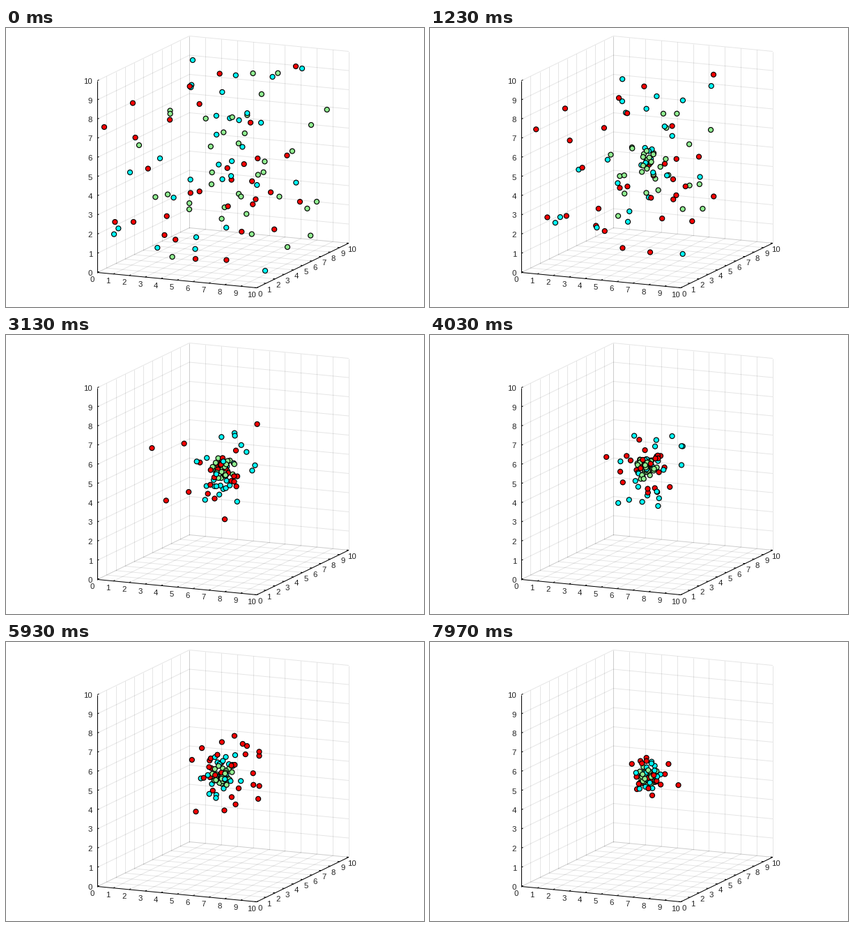
A matplotlib script that plays this animation: 600x400 px, repeating every 8000 ms.

```python
import numpy as np
import matplotlib.pyplot as plt
from matplotlib.animation import FuncAnimation
from matplotlib.collections import LineCollection

W, H, DPI = 600, 400, 100
FRAMES, LOOP = 240, 8000
PX = 72 / DPI

# Screen step of one unit along x, y and z, and the corner where all are zero
AXES = np.array([[22.87, 2.2], [13.2, -6.4], [0, -27.5]])
ORIGIN = np.array([131.2, 350.5])
CENTER = ORIGIN + 5 * AXES.sum(axis=0)
VIEW = np.cross(AXES[:, 1], AXES[:, 0])
VIEW *= np.sign(VIEW[1]) / np.linalg.norm(VIEW)

# Outermost starting dots on screen; the rest of each swarm is random
SWARMS = [
    dict(color="#90ee90", count=37, pull=24, core=1.0, drag=0.05, top=3.0,
         outer=[(191, 168), (446, 249), (404, 314), (438, 139)]),
    dict(color="#00ffff", count=31, pull=13, core=2.3, drag=0.4, top=9.0,
         outer=[(372, 348), (178, 207), (268, 46), (425, 58)]),
    dict(color="#ff0000", count=32, pull=5.6, core=2.4, drag=0.25, top=9.0,
         outer=[(141, 142), (183, 278), (416, 55), (272, 331)]),
]


def project(x, y, z):
    return ORIGIN + np.array([x, y, z]) @ AXES


def lift(screen):
    """Place screen points halfway along their line of sight in the cube."""
    flat = (np.array(screen) - CENTER) @ np.linalg.pinv(AXES)
    ends = np.stack([(-5 - flat) / VIEW, (5 - flat) / VIEW])
    near = ends.min(axis=0).max(axis=1)
    far = ends.max(axis=0).min(axis=1)
    return flat + ((near + far) / 2)[:, None] * VIEW


def swing(radius, pull, core, drag, top, sub=4):
    """Signed distance from the centre at every frame."""
    dt = LOOP / 1000 / FRAMES / sub
    r, v = radius.copy(), np.zeros_like(radius)
    track = []
    for _ in range(FRAMES):
        track.append(r.copy())
        for _ in range(sub):
            v = v - dt * (pull * r / (r * r + core * core) + drag * v)
            v = np.clip(v, -top, top)
            r = r + dt * v
    return np.array(track)


def fly(swarm):
    """Positions relative to the centre: frame, dot, axis."""
    outer = lift(swarm["outer"])
    inner = rng.uniform(-4.5, 4.5, (swarm["count"] - len(outer), 3))
    start = np.vstack([outer, inner])
    radius = np.linalg.norm(start, axis=1)
    track = swing(radius, *(swarm[k] for k in ("pull", "core", "drag", "top")))
    return track[:, :, None] * (start / radius[:, None])


rng = np.random.default_rng(5)
paths = np.concatenate([fly(s) for s in SWARMS], axis=1)
colors = np.repeat([s["color"] for s in SWARMS], [s["count"] for s in SWARMS])
spots = CENTER + paths @ AXES
order = np.argsort(-(paths @ VIEW), axis=1)

fig = plt.figure(figsize=(W / DPI, H / DPI), dpi=DPI, facecolor="white")
ax = fig.add_axes([0, 0, 1, 1])
ax.set_xlim(0, W)
ax.set_ylim(H, 0)
ax.axis("off")


def label(k, at, shift, align="center"):
    x, y = at + np.array(shift)
    ax.text(x, y, str(k), ha=align, va="center_baseline", color="#222222",
            family="Liberation Sans", size=11.4 * PX)


grid = []
edges = [(project(0, 0, 0), project(0, 0, 10)),
         (project(0, 0, 0), project(10, 0, 0)),
         (project(10, 0, 0), project(10, 10, 0))]
for k in range(11):
    grid += [(project(0, k, 0), project(0, k, 10)),
             (project(0, 0, k), project(0, 10, k)),
             (project(k, 10, 0), project(k, 10, 10)),
             (project(0, 10, k), project(10, 10, k)),
             (project(k, 0, 0), project(k, 10, 0)),
             (project(0, k, 0), project(10, k, 0))]
    edges += [(project(0, 0, k), project(0, 0.17, k)),
              (project(k, 0, 0), project(k, 0.17, 0)),
              (project(10, k, 0), project(9.87, k, 0))]
    label(k, project(0, 0, k), (-7, 0.5), "right")
    label(k, project(k, 0, 0), (-7.5, 9.5))
    label(k, project(10, k, 0), (4.5, 8.5))
ax.add_collection(LineCollection(grid, colors=[(0, 0, 0, 0.1)], linewidths=PX))
ax.add_collection(LineCollection(edges, colors="black", linewidths=PX))

dots = ax.scatter(*spots[0].T, s=(7 * PX) ** 2, c=colors, edgecolors="black",
                  linewidths=1.2 * PX, zorder=3)


def draw(i):
    rank = order[i]
    dots.set_offsets(spots[i][rank])
    dots.set_facecolor(colors[rank])
    return (dots,)


anim = FuncAnimation(fig, draw, frames=FRAMES, interval=LOOP / FRAMES,
                     init_func=lambda: draw(0), blit=True, repeat=True,
                     repeat_delay=0)
plt.show()
```
